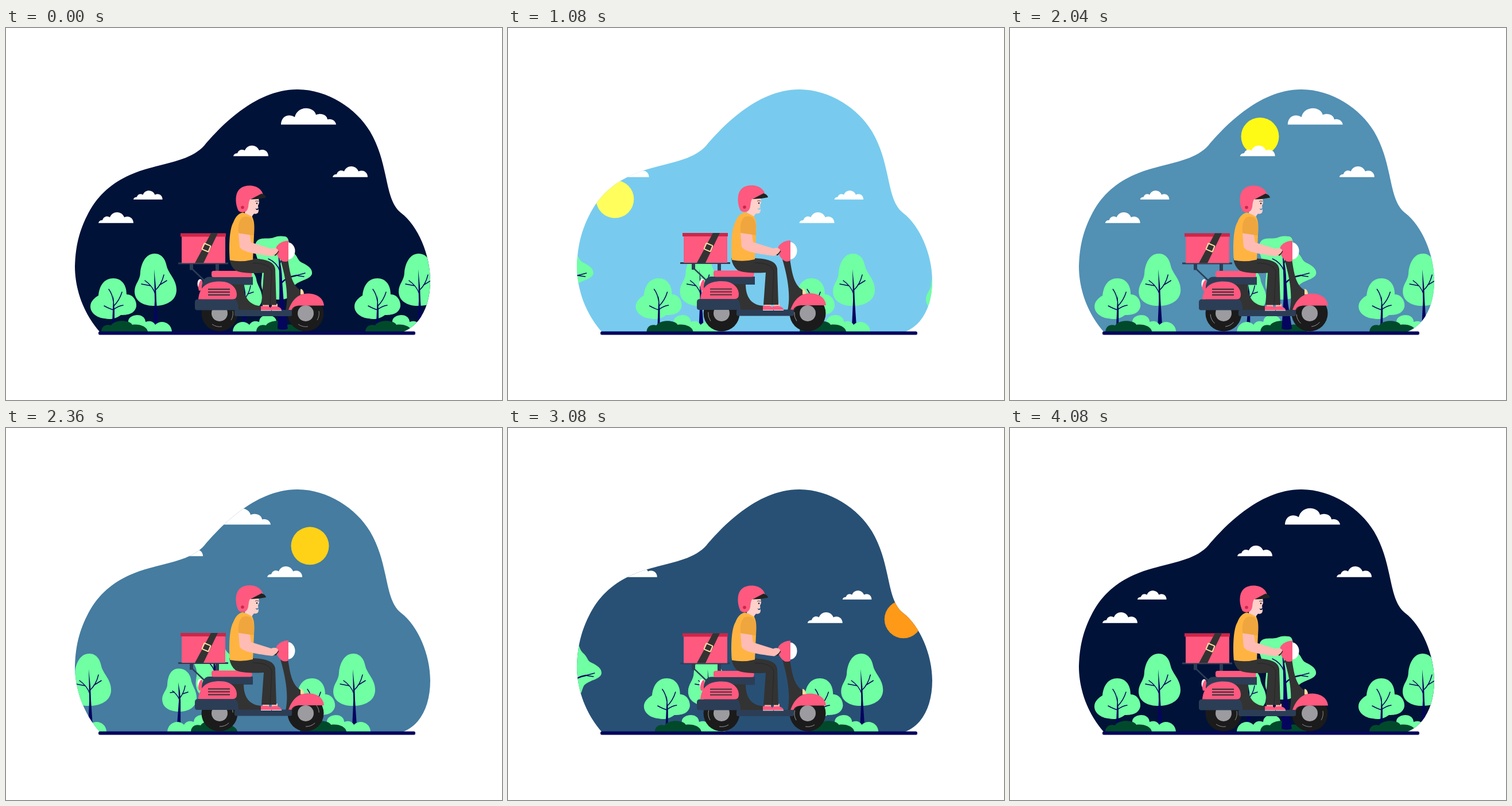
Animation, 864 px wide and 648 px high, one loop 4120 ms. Source, as an HTML page:

```html
<!DOCTYPE html>
<html lang="en">
<head>
<meta charset="utf-8">
<title>Delivery ride</title>
<style>
html, body { margin: 0; width: 100%; height: 100%; overflow: hidden; background: #fff; }
svg { display: block; width: 100vw; height: 100vh; }
.leaf { fill: #70ffa3; }
.dark { fill: #004a2b; }
.wood { fill: #05055e; }
.twig { fill: none; stroke: #05055e; stroke-width: 1.5; stroke-linecap: round; }
.bough { stroke-width: 2.4; }
.pink { fill: #ff597f; }
.rose { fill: #cc2649; }
.slate { fill: #2c3e56; }
.coal { fill: #333; }
.skin { fill: #ffbcb4; }
</style>
</head>
<body>
<svg viewBox="0 0 864 648">
<defs>
  <clipPath id="blob"><path d="M163 529C135 497 120 455 120 415C121 375 130 346 147 316C172 274 210 255 250 244C290 233 325 228 346 204C370 176 432 107 507 107C560 107 610 140 634 180C668 237 658 298 688 322C718 345 739 395 739 440C739 485 721 518 692 529Z"/></clipPath>
  <path id="bigCloud" fill="#fff" d="M0 0C0-15 14-20 24-13C28-33 57-33 61-17C70-21 80-17 81-9C88-11 95-7 96 0Z"/>
  <path id="cloud" fill="#fff" d="M0 0C1-4 4-5 7-5C9-11 14-13 20-10C24-21 40-22 45-10C54-14 61-8 61 0Z"/>
  <path id="bush" class="leaf" d="M207 529C207 518 209 514 213 512C212 498 242 494 243 512C252 509 257 512 260 517C270 507 288 513 289 529Z"/>
  <path id="lowBush" class="dark" d="M166 529C166 520 174 515 183 518C189 508 215 508 220 517C232 515 246 520 247 529Z"/>
  <g id="grove">
    <path class="leaf" d="M187 436C201 436 210 447 210 464C222 464 228 476 227 485C224 499 210 500 200 500C193 505 184 509 172 506C158 505 147 496 147 485C147 475 156 469 161 466C163 447 172 436 187 436Z"/>
    <path class="wood" d="M185 516L186 490L187 465L189 490L189 516Z"/>
    <path class="twig" d="M187 491Q180 489 171 484M187 476Q185 463 179 455M187 485Q198 474 202 460M188 490Q196 484 204 483"/>
    <path class="leaf" d="M259 393C272 393 278 404 280 415C283 428 297 438 297 456C297 472 284 483 261 484C240 485 224 476 224 459C224 445 234 440 234 425C236 408 244 393 259 393Z"/>
    <path class="wood" d="M257 520L259 475L258 420L261 450L262 475L265 520Z"/>
    <path class="twig" d="M260 463Q255 449 242 440M252 449L236 446M260 457Q271 447 275 430M267 448L280 440"/>
    <use href="#bush"/><use href="#lowBush"/>
  </g>
  <g id="copse">
    <path class="leaf" d="M187 419C199 419 206 428 208 437C209 448 218 456 218 470C218 487 203 494 188 494C172 494 158 488 158 472C158 462 167 456 167 446C168 432 173 419 187 419Z"/>
    <path class="wood" d="M184 516L187 475L186 443L189 460L190 475L190 516Z"/>
    <path class="twig" d="M188 473Q184 464 176 458M179 460L172 461M189 470Q196 461 198 449M194 463L203 460"/>
    <use href="#bush" transform="translate(456) scale(-1 1)"/>
    <path class="leaf" d="M257 363C268 364 262 380 272 391C282 399 279 405 288 409C299 414 306 420 305 428C303 438 284 439 275 448C269 457 272 473 250 473C233 474 220 466 217 450C215 436 222 428 215 414C210 402 202 384 207 375C212 362 228 369 238 365C245 362 251 362 257 363Z"/>
    <use href="#lowBush" x="42"/>
    <path class="wood" d="M245 524L248 475Q249 430 246 391Q253 420 253 440L256 480L263 524Q254 527 245 524Z"/>
    <path class="twig bough" d="M251 445Q260 434 278 431"/>
    <path class="twig" d="M278 431L293 427M277 431L291 433M249 411Q255 395 254 378M249 423Q243 408 229 402"/>
    <use href="#cloud" visibility="hidden"/>
  </g>
  <g id="strip">
    <use href="#grove"/><use href="#copse" x="228"/><use href="#grove" x="460"/>
  </g>
  <g id="clouds">
    <use href="#bigCloud" x="479" y="168.3"/>
    <use href="#cloud" x="396" y="223.3"/>
    <use href="#cloud" x="569" y="259.700"/>
    <use href="#cloud" transform="translate(222 298.700) scale(.83)"/>
    <use href="#cloud" x="161" y="339.700"/>
  </g>
  <g id="wheel">
    <circle r="31.5" fill="#1b1b1b"/>
    <circle r="14" fill="#9b9ba0"/>
    <path class="shine" fill="none" stroke="#aaa" stroke-width=".8" d="M23-4A23 23 0 0 1 20 12M4 23A23 23 0 0 1-13 19"/>
  </g>
</defs>

<g clip-path="url(#blob)">
  <rect id="sky" x="110" y="100" width="640" height="430"/>
  <circle id="sun" r="33"/>
  <g id="air"><use href="#clouds"/><use href="#clouds" x="731"/></g>
  <g id="wood"><use href="#strip"/><use href="#strip" x="726.5"/></g>
</g>
<rect x="161" y="528.5" width="552" height="6" rx="2.5" fill="#05055e"/>

<use href="#wheel" x="372" y="497"/>
<use href="#wheel" x="522" y="497"/>
<g id="ride">
  <!-- rack and box -->
  <path fill="none" stroke="#2c3e56" stroke-width="2.5" d="M323 418L345 439"/>
  <path class="slate" d="M300 408H387V411H371V424H365V411H326V421H320V411H300Z"/>
  <path class="pink" d="M306 362H382V409H306Z"/>
  <path class="rose" d="M304 357H383V363H304Z"/>
  <path class="coal" d="M357 357H369L344 409H329Z"/>
  <rect x="-6" y="-5.5" width="12" height="11" rx="1" fill="none" stroke="#ffe0a6" stroke-width="2" transform="translate(349 382) rotate(23)"/>
  <!-- rear body -->
  <ellipse cx="338" cy="445" rx="4.500" ry="8" fill="#fff"/>
  <path class="pink" d="M339 439Q333 448 336 457H342V439Z"/>
  <path class="slate" d="M341 450Q343 433 354 433H430V447H414V480H341Z"/>
  <path class="coal" d="M390 446H414C414 468 423 484 448 484V492H402Z"/>
  <path class="slate" d="M329 477Q329 472 335 472H398Q405 474 405 491H333Q329 491 329 487Z"/>
  <path class="pink" d="M335 472C337 450 350 441 372 441C395 441 402 455 402 464Q402 472 395 472Z"/>
  <path stroke="#333" stroke-width="1.8" d="M352 454.500H390M352 459.500H390M352 464.500H390"/>
  <rect class="pink" x="358" y="422.500" width="70.500" height="11" rx="3.500"/>
  <!-- front body -->
  <path class="coal" d="M478 403L491 402C495 430 499 450 516 458L514 470L498 492H487C492 470 489 440 478 403Z"/>
  <path fill="#ffdca0" d="M513 454Q518 454 519 463L513 464Z"/>
  <path class="pink" d="M492 491C500 468 513 462 527 462C545 463 553 472 554 483H510Q499 484 497 491Z"/>
  <rect class="slate" x="398" y="490.500" width="100" height="11" rx="3"/>
  <path fill="#fff" d="M491 373A12.500 15 0 0 1 491 403Z"/>
  <path class="pink" d="M492 370V405Q484 409 478 403C470 395 468 385 472 379Q480 370 492 370Z"/>
  <!-- legs -->
  <path class="skin" d="M447 480H458V487H447ZM463 480H473V487H463Z"/>
  <path class="pink" d="M461 485L470 484Q480 486 480 491H461ZM444 484L456 484Q463 487 462 491H444Z"/>
  <path stroke="#fff" d="M444 491.500H462M463 491.500H480"/>
  <path class="coal" d="M389 401H430C450 402 467 405 469 419L471 482H445L449 426C430 427 412 427 400 422Q391 415 389 401Z"/>
  <path fill="none" stroke="#222" stroke-width=".8" d="M430 409Q460 409 463 424L460 482"/>
  <!-- torso and arm -->
  <path class="skin" d="M417 318L429 322V331H414Z"/>
  <path fill="#ffb441" d="M413 321L428 327C433 335 433 345 432 360L430 403Q410 408 390 404C388 380 389 350 396 338C400 328 405 322 413 321Z"/>
  <path fill="#efa63e" d="M412 329Q430 324 432 345V361L405 357C404 345 405 335 412 329Z"/>
  <path stroke="#222" stroke-width="4" stroke-linecap="round" d="M469 394L473 389"/>
  <path class="skin" d="M405 357L425 360L427 373L462 384Q470 381 474 386Q475 389 469 394L464 397L455 396C435 393 412 390 407 381Z"/>
  <!-- head -->
  <path fill="#ffd0ca" d="M424 297L440 295L441 304L439 309L440 317C440 322 437 324 432 323L428 328L416 321C421 315 421 305 424 297Z"/>
  <path id="mouth" d="M434 313.500Q437 315.500 440 313Q440 317 436.500 316.500Z"/>
  <circle cx="437" cy="305" r="1.300" fill="#222"/>
  <path fill="none" stroke="#222" stroke-width=".8" d="M434 301.500Q437 300 440 301.500"/>
  <path class="pink" d="M424 274C440 274 448 284 448 293L425 298C421 305 424 312 419 318Q412 323 405 318C400 308 400 298 401 292C403 280 412 274 424 274Z"/>
  <circle class="rose" cx="412" cy="312" r="2.800"/>
  <path fill="#222" d="M426 298L445 288Q452 290 453 295Q440 298 426 298Z"/>
</g>
</svg>
<script>
const LOOP = 4120, STEP = 40, PASS = 2040, SPEED = 0.356;
const $ = id => document.getElementById(id);
const shine = document.querySelector('.shine');

// time, value...
const skyKeys = [[0, 0, 18, 56], [833, 130, 218, 253], [4080, 0, 18, 56]];
const sunKeys = [[0, 255, 255, 180], [640, 255, 253, 130], [1480, 255, 255, 57],
  [2040, 255, 249, 22], [2680, 255, 171, 26], [3520, 255, 133, 22], [4080, 255, 110, 20]];
const sunPath = [[0, 35, 540], [640, 106, 397], [1480, 274, 222], [2040, 435.5, 189],
  [2680, 613, 246], [3520, 756, 443], [4080, 815, 570]];

function segment(keys, t) {
  let i = 0;
  while (i < keys.length - 2 && t > keys[i + 1][0]) i++;
  return [i, (t - keys[i][0]) / (keys[i + 1][0] - keys[i][0])];
}

function color(keys, t) {
  const [i, f] = segment(keys, t);
  const mix = n => Math.round(keys[i][n] + (keys[i + 1][n] - keys[i][n]) * f);
  return `rgb(${mix(1)},${mix(2)},${mix(3)})`;
}

// Hermite curve through the keys
function curve(keys, t, n) {
  const [i, f] = segment(keys, t);
  const slope = k => {
    const a = keys[Math.max(k - 1, 0)], b = keys[Math.min(k + 1, keys.length - 1)];
    return (b[n] - a[n]) / (b[0] - a[0]);
  };
  const span = keys[i + 1][0] - keys[i][0], g = 1 - f;
  return keys[i][n] * (1 + 2 * f) * g * g + keys[i + 1][n] * f * f * (3 - 2 * f)
    + span * f * g * (slope(i) * g - slope(i + 1) * f);
}

function draw(now) {
  const t = Math.floor(now % LOOP / STEP) * STEP;
  const u = t <= PASS ? t : (t - PASS) % PASS;
  const shift = `translate(${-SPEED * u})`;
  const sky = color(skyKeys, t);
  $('sky').setAttribute('fill', sky);
  $('mouth').setAttribute('fill', sky);
  $('sun').setAttribute('fill', color(sunKeys, t));
  $('sun').setAttribute('cx', curve(sunPath, t, 1));
  $('sun').setAttribute('cy', curve(sunPath, t, 2));
  $('air').setAttribute('transform', shift);
  $('wood').setAttribute('transform', shift);
  const bob = Math.cos(u / 255 * 2 * Math.PI) * 0.5;
  $('ride').setAttribute('transform', `translate(0 ${bob})`);
  shine.setAttribute('transform', `rotate(${u / 168 * 360})`);
  requestAnimationFrame(() => draw(performance.now() - start));
}
const start = performance.now();
draw(0);
</script>
</body>
</html>
```
